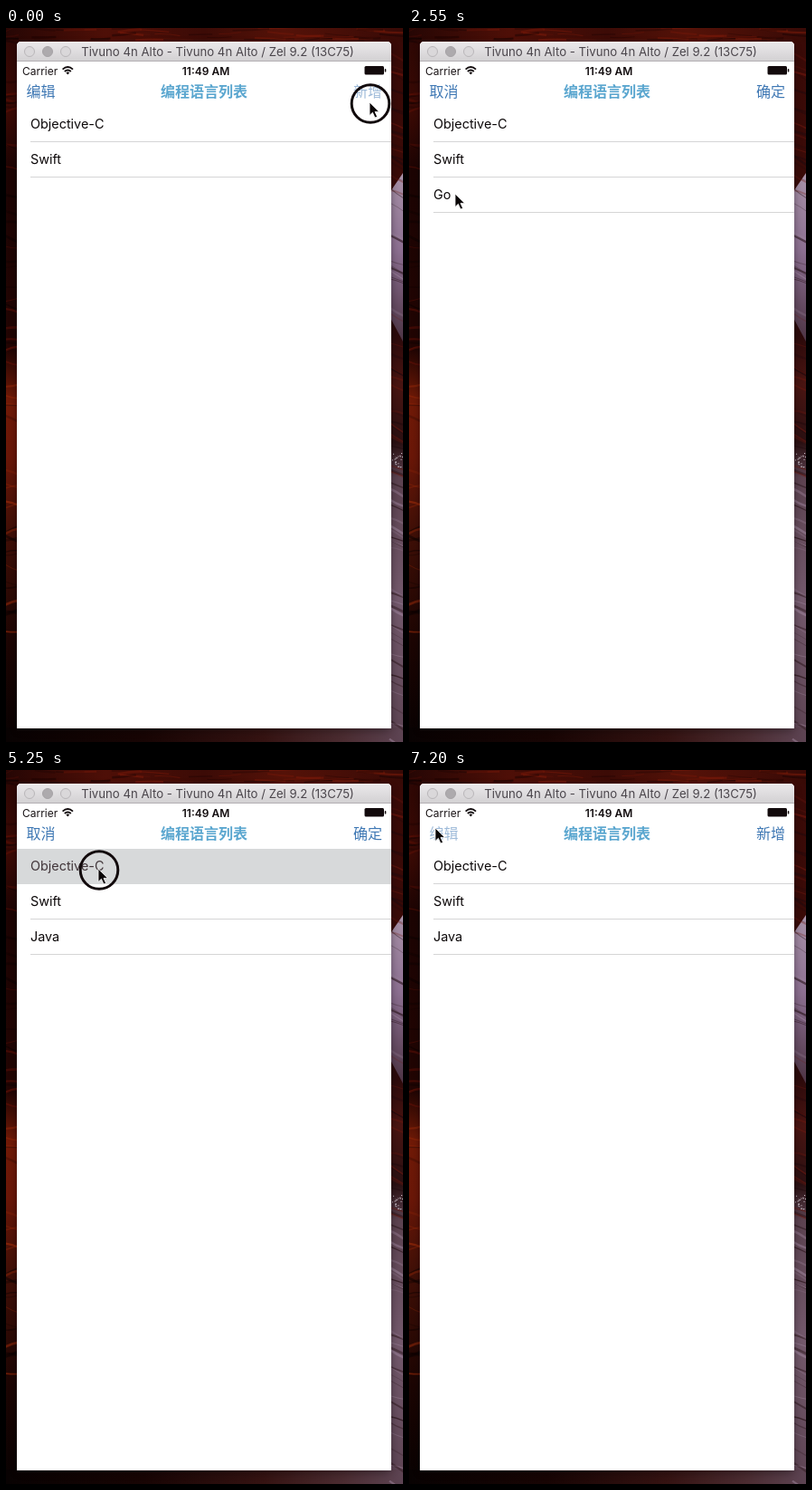
An HTML page that plays this animation: 439 px wide and 788 px high, repeating every 7500 ms.

```html
<!DOCTYPE html>
<html lang="zh-CN">
<head>
<meta charset="utf-8">
<title>编程语言列表</title>
<style>
html, body { margin: 0; width: 100%; height: 100%; overflow: hidden; background: #1a0503; }
svg { display: block; width: 439px; height: 788px; }
text { font-family: Inter, "Noto Sans CJK SC", "Noto Sans CJK", sans-serif; white-space: pre; }
.zh { font-family: "Noto Sans CJK SC", "Noto Sans CJK", sans-serif; }
.mid { text-anchor: middle; }
.nav { font-size: 16px; fill: #3f78b4; }
.btn { font-size: 17px; fill: #3b8ec8; }
</style>
</head>
<body>
<svg viewBox="0 0 439 788" xmlns="http://www.w3.org/2000/svg">
  <defs>
    <linearGradient id="left" x2="0" y2="1">
      <stop offset="0" stop-color="#2c0704"/><stop offset=".12" stop-color="#3a0a05"/>
      <stop offset=".2" stop-color="#1c0403"/><stop offset=".45" stop-color="#220503"/>
      <stop offset=".52" stop-color="#701a07"/><stop offset=".6" stop-color="#6a1708"/>
      <stop offset=".7" stop-color="#421007"/><stop offset=".86" stop-color="#1c0503"/>
      <stop offset="1" stop-color="#080202"/>
    </linearGradient>
    <linearGradient id="right" x2="0" y2="1">
      <stop offset="0" stop-color="#3a0a07"/><stop offset=".2" stop-color="#3a0b08"/>
      <stop offset=".43" stop-color="#2c0a0b"/><stop offset=".5" stop-color="#4a1512"/>
      <stop offset=".58" stop-color="#2a1012"/><stop offset=".63" stop-color="#5c4250"/>
      <stop offset=".8" stop-color="#73596c"/><stop offset="1" stop-color="#5d4453"/>
    </linearGradient>
    <linearGradient id="top">
      <stop offset="0" stop-color="#260604"/><stop offset=".25" stop-color="#4e0f07"/>
      <stop offset=".5" stop-color="#3c0b06"/><stop offset=".7" stop-color="#551208"/>
      <stop offset="1" stop-color="#380a06"/>
    </linearGradient>
    <linearGradient id="bottom">
      <stop offset="0" stop-color="#080202"/><stop offset=".35" stop-color="#180504"/>
      <stop offset=".65" stop-color="#351312"/><stop offset=".85" stop-color="#4b2c31"/>
      <stop offset="1" stop-color="#5d4453"/>
    </linearGradient>
    <linearGradient id="mauve" x2="0" y2="1">
      <stop offset="0" stop-color="#a892a8"/><stop offset=".45" stop-color="#8d7092"/>
      <stop offset="1" stop-color="#4d3444"/>
    </linearGradient>
    <linearGradient id="bar" x2="0" y2="1">
      <stop offset="0" stop-color="#ebe9eb"/><stop offset="1" stop-color="#d2d0d2"/>
    </linearGradient>
    <filter id="soft" x="-10%" y="-10%" width="120%" height="120%"><feGaussianBlur stdDeviation="5"/></filter>
    <clipPath id="screen"><rect x="12" y="87" width="414" height="686"/></clipPath>
  </defs>

  <rect width="220" height="788" fill="url(#left)"/>
  <rect x="220" width="219" height="788" fill="url(#right)"/>
  <rect width="439" height="16" fill="url(#top)"/>
  <rect y="772" width="439" height="16" fill="url(#bottom)"/>
  <path d="M439 160L424 182V318L439 346Z" fill="url(#mauve)"/>
  <g id="grain" fill="none"></g>
  <rect x="12" y="19" width="414" height="756" rx="5" opacity=".4" filter="url(#soft)"/>

  <path d="M12 773V20Q12 15 17 15H421Q426 15 426 20V773Z" fill="#fff"/>
  <path d="M12 37V20Q12 15 17 15H421Q426 15 426 20V37Z" fill="url(#bar)"/>
  <path d="M12 36.5H426" stroke="#b3afb3"/>
  <g stroke="#b9b6b9" fill="#dad8da">
    <circle cx="26" cy="26" r="5.5"/><circle cx="46" cy="26" r="5.5" fill="#adaaad" stroke="#a5a2a5"/>
    <circle cx="66" cy="26" r="5.5"/>
  </g>
  <text class="mid" x="234" y="31" font-size="13.2" fill="#4a454b">Tivuno 4n Alto - Tivuno 4n Alto / Zel 9.2 (13C75)</text>

  <g id="list" clip-path="url(#screen)"></g>

  <text x="18" y="51.5" font-size="12" fill="#1a1416">Carrier</text>
  <g fill="none" stroke="#120c0e" stroke-width="1.9">
    <path d="M62.6 45.6Q68.3 40.4 74 45.6M64.8 48Q68.3 44.8 71.8 48"/>
    <path d="M66.4 49.2L68.3 51.4L70.2 49.2Q68.3 47.6 66.4 49.2Z" fill="#120c0e" stroke="none"/>
  </g>
  <text class="mid" x="221" y="51.5" font-size="12" font-weight="600" fill="#120c0e">11:49 AM</text>
  <rect x="396.5" y="42" width="21.5" height="9.5" rx="1.5" fill="#120a0c"/>
  <rect x="418.8" y="45" width="1.5" height="3.6" rx=".7" fill="#120a0c"/>

  <text id="navL" class="zh nav" x="22.5" y="75.5"></text>
  <text class="zh mid" x="219" y="75.5" font-size="16" font-weight="700" fill="#5aa6cf">编程语言列表</text>
  <text id="navR" class="zh nav" x="384" y="75.5"></text>

  <rect id="dim" x="12" y="37" width="414" height="736" opacity="0"/>
  <g id="alert">
    <rect x="84" y="335" width="270" height="140" rx="12" fill="#e8eaea"/>
    <text class="zh mid" x="219.5" y="371" font-size="17" font-weight="500" fill="#3a2c32">请输入一个新的编程语言：</text>
    <rect x="99.5" y="395" width="239" height="24.5" rx="3" fill="#f2f3f3"/>
    <text id="typed" x="104" y="412" font-size="13" fill="#33292d"></text>
    <rect id="caret" y="399.5" width="1.5" height="15" fill="#4a84cc"/>
    <path d="M84 431.5H354M219.5 432V475" stroke="#d0d3d3"/>
    <text class="zh mid btn" x="152" y="460">取消</text>
    <text class="zh mid btn" x="287" y="460">确定</text>
  </g>

  <circle id="ring" r="20.8" fill="none" stroke="#120a0c" stroke-width="3"/>
  <path id="cursor" d="M0 0V14.5L3.4 11.3L6 17L8.6 15.9L6 10.4H10.6Z" fill="#0a0607" stroke="#fff" stroke-width=".8"/>
</svg>
<script>
const LOOP = 7500, STEP = 150, ROW = 39, TOP = 87;
const $ = id => document.getElementById(id);
const set = (el, attrs) => { for (const k in attrs) el.setAttribute(k, attrs[k]); };
const add = (parent, tag, attrs) => {
  const el = document.createElementNS("http://www.w3.org/2000/svg", tag);
  set(el, attrs);
  return parent.appendChild(el);
};
const ramp = (t, a, b) => Math.min(1, Math.max(0, (t - a) / (b - a)));
const during = (t, spans) => spans.some(([a, b]) => t >= a && t < b);

// Steps at which the picture keeps its previous state
const HOLDS = new Set([300, 600, 1050, 3000, 3750, 4050, 5850, 6000, 6450, 6900, 7350]);

// Pointer path: time, x, y
const PATH = [
  [0, 402, 82], [450, 402, 82], [900, 385, 150], [1500, 296, 459], [1650, 292, 456], [1800, 290, 455],
  [2250, 31, 68], [2400, 33, 74], [2550, 51, 183], [2850, 51, 183], [3450, 288, 454], [3600, 288, 454],
  [3900, 393, 195], [4200, 399, 74], [4500, 399, 70], [4950, 33, 68], [5100, 44, 76], [5250, 102, 109],
  [5550, 102, 109], [5700, 105, 122], [6600, 105, 122], [7050, 29, 64], [7500, 29, 64]
];
const PRESSED = [[0, 150], [1650, 1800], [2250, 2400], [2700, 2850], [3450, 3600],
  [4350, 4500], [4950, 5100], [5250, 5550], [6150, 6600], [7050, 7200]];
const EDITING = [[2400, 4500], [5100, 7200]];
const FADED_L = [[2250, 2400], [4950, 5100], [7050, 7500]];
const FADED_R = [[0, 450], [4350, 4500]];
const ACTIVE = [[[5250, 5700]], [[6150, 6750]], [[2700, 2850]]];

function pointer(t) {
  let i = 1;
  while (PATH[i][0] < t) i++;
  const [a, x0, y0] = PATH[i - 1], [b, x1, y1] = PATH[i];
  const k = ramp(t, a, b);
  return [x0 + (x1 - x0) * k, y0 + (y1 - y0) * k];
}

function paintGrain() {
  let seed = 11;
  const rnd = () => (seed = seed * 16807 % 2147483647) / 2147483647;
  const streak = (x, y, dx, dy, stroke) => add($("grain"), "path", {
    d: `M${x} ${y}q${dx / 2} ${dy / 2 + rnd() * 4 - 2} ${dx} ${dy}`,
    stroke, "stroke-width": .7 + rnd() * 2, opacity: .2 + rnd() * .4
  });
  for (let i = 0; i < 60; i++) {
    const y = rnd() * 700;
    streak(-2, y, 16, rnd() * 16 - 8, i % 2 ? "#0c0202" : y > 370 ? "#a8300c" : "#641208");
  }
  for (let i = 0; i < 40; i++) streak(rnd() * 439, rnd() * 15, 20 + rnd() * 25, rnd() * 6 - 3, i % 2 ? "#180303" : "#7a1a0a");
  for (let i = 0; i < 80; i++) {
    const y = rnd() * 788, pale = y > 490 || (y > 185 && y < 310);
    streak(424, y, 18, 4 + rnd() * 9, i % 2 ? "#200a0e" : pale ? "#a389a2" : "#701a10");
  }
  for (let i = 0; i < 22; i++) add($("grain"), "rect", {
    x: 427 + rnd() * 11, y: 469 + rnd() * 17, width: 1, height: 1, fill: "#d8cfd8"
  });
}

const rows = ["Objective-C", "Swift", "Go"].map(name => {
  const g = add($("list"), "g", {});
  add(g, "rect", { x: 12, width: 414, height: ROW, fill: "#fff" });
  add(g, "path", { d: "M27 38.5H426", stroke: "#d5d5d6" });
  const back = add(g, "rect", { x: 12, width: 414, height: ROW, fill: "#d7d9da" });
  const label = add(g, "text", { x: 27, y: 24.3, "font-size": 14.4 });
  label.textContent = name;
  return { g, back, label };
});

function drawList(t) {
  const restored = t >= 7200;
  const gone = [restored ? 0 : ramp(t, 5400, 5700), restored ? 0 : ramp(t, 6450, 6750), 0];
  let y = TOP;
  rows.forEach(({ g, back, label }, i) => {
    const on = during(t, ACTIVE[i]);
    const shown = i < 2 || t >= 1950;
    set(g, { transform: `translate(0 ${y})`, opacity: shown ? 1 - gone[i] : 0 });
    set(back, { opacity: on ? 1 : 0 });
    set(label, { fill: on ? "#42363a" : "#0c0809" });
    y += ROW * (1 - gone[i]);
  });
  rows[2].label.textContent = t < 3600 ? "Go" : "Java";
}

function drawAlert(t) {
  const first = t < 2400;
  const enter = first ? ramp(t, 300, 750) : ramp(t, 2700, 3000);
  const leave = first ? ramp(t, 1650, 1950) : ramp(t, 3450, 3750);
  const show = enter * (1 - leave), s = 1 + .12 * (1 - enter);
  const word = first ? "Go".slice(0, Math.max(0, (t - 1200) / STEP))
    : t < 3150 ? "Go" : t < 3300 ? "Ja" : "Java";
  set($("dim"), { opacity: .29 * show });
  set($("alert"), { opacity: show, transform: `translate(219 405) scale(${s}) translate(-219 -405)` });
  $("typed").textContent = word;
  set($("caret"), { x: 104.5 + (word ? $("typed").getComputedTextLength() : 0) });
}

function draw(ms) {
  let t = Math.floor(ms / STEP) * STEP;
  while (HOLDS.has(t)) t -= STEP;
  const edit = during(t, EDITING);
  $("navL").textContent = edit ? "取消" : "编辑";
  $("navR").textContent = edit ? "确定" : "新增";
  set($("navL"), { opacity: during(t, FADED_L) ? .5 : 1 });
  set($("navR"), { opacity: during(t, FADED_R) ? .5 : 1 });
  drawList(t);
  drawAlert(t);
  const [x, y] = pointer(t);
  set($("cursor"), { transform: `translate(${x} ${y})` });
  set($("ring"), { cx: x + 1, cy: y + 1.5, opacity: during(t, PRESSED) ? 1 : 0 });
}

paintGrain();
const start = performance.now();
function tick() {
  draw((performance.now() - start) % LOOP);
  requestAnimationFrame(tick);
}
tick();
</script>
</body>
</html>
```
